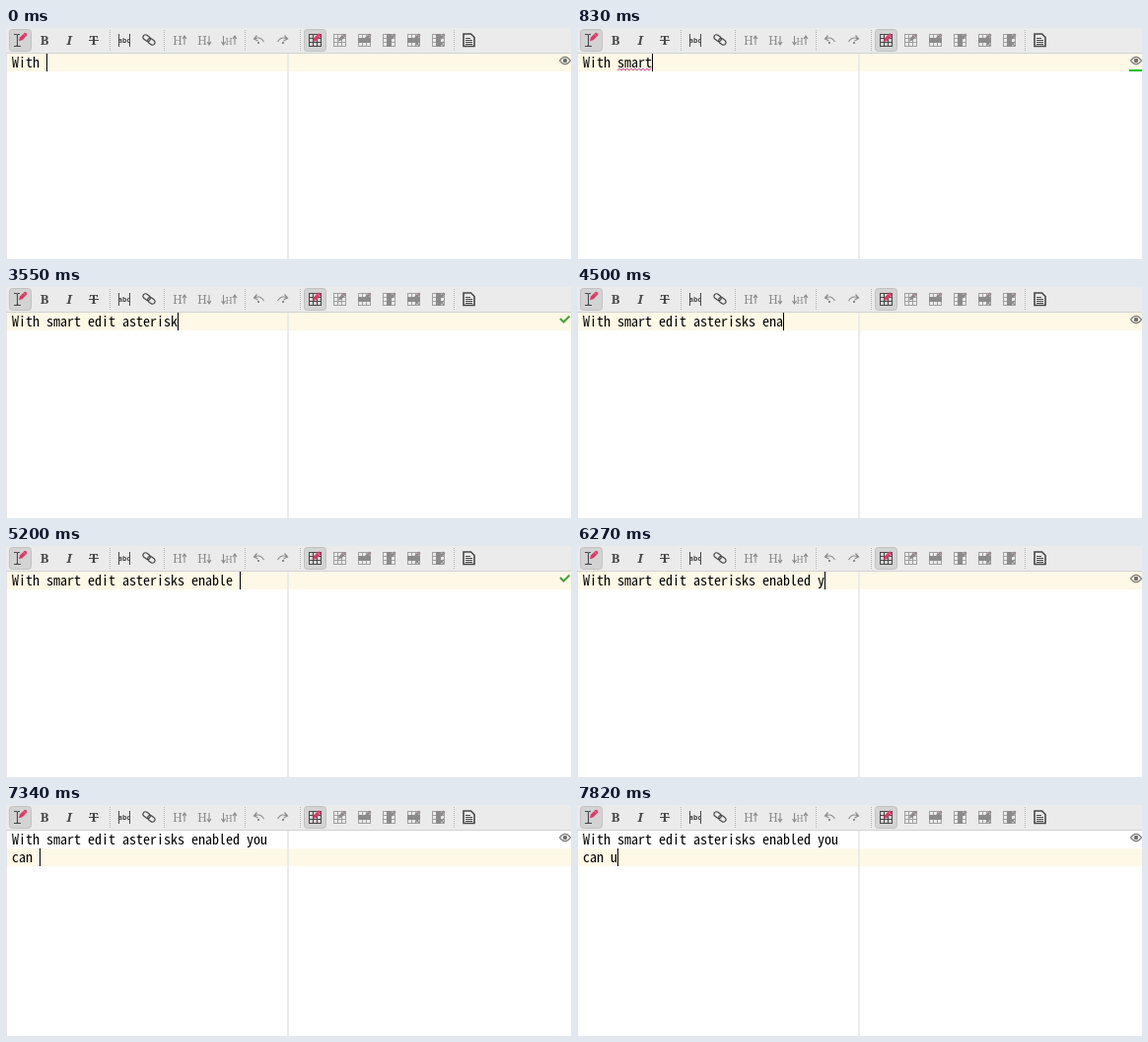
Write an HTML page with a canvas that moves like this. It is 573 px wide and 234 px high and loops after 8000 ms.

```html
<!DOCTYPE html>
<html lang="en">
<head>
<meta charset="utf-8">
<title>Typing in an editor</title>
<style>
html, body { margin: 0; width: 100%; height: 100%; overflow: hidden; background: #fff; }
canvas { display: block; }
</style>
</head>
<body>
<canvas id="stage" width="573" height="234"></canvas>
<script>
const LOOP = 8000, COL = 7, LEFT = 6, TOP = 26, ROW = 18;
const DARK = '#484848', GRAY = '#8b8b8b', PINK = '#d83a68';
const MONO = '"Noto Sans Mono CJK JP", "Noto Sans Mono", monospace';
const SERIF = '"Noto Serif", serif';
const TEXT = 'With smart edit asterisks enabled you can u';
const WRAP = 37;

// Typing bursts: start, end, character count at start, at end
const BURSTS = [
  [120, 480, 6, 9], [710, 710, 10, 10], [1070, 1660, 11, 16], [1900, 1900, 18, 18],
  [2490, 2600, 19, 20], [2840, 3190, 21, 24], [3790, 3790, 25, 25], [4020, 4260, 26, 28],
  [4500, 4960, 29, 33], [5560, 5560, 34, 34], [6270, 6510, 35, 37], [6750, 6750, 38, 38],
  [6990, 7340, 39, 42], [7820, 7820, 43, 43]
];
// Spans in which the inspection has passed
const PASSED = [[2250, 2490], [3550, 3790], [5200, 5440], [5920, 6270], [7580, 7820]];

const stage = document.getElementById('stage');
let c = stage.getContext('2d');

function box(x, y, w, h, color) {
  c.fillStyle = color;
  c.fillRect(x, y, w, h);
}
function line(d, color, width = 1) {
  c.strokeStyle = color;
  c.lineWidth = width;
  c.stroke(new Path2D(d));
}
function fill(d, color) {
  c.fillStyle = color;
  c.fill(new Path2D(d));
}
function label(s, x, y, font, color) {
  c.font = font;
  c.fillStyle = color;
  c.fillText(s, x, y);
}

function pencil(x, y, color, s = 1) {
  c.save();
  c.translate(x, y);
  c.scale(s, s);
  fill('M0 0L1 -3.6L5.6 -8.2Q6.5 -8.8 7.3 -8L8.2 -7Q8.8 -6.2 8.1 -5.5L3.6 -1Z', color);
  line('M4.6 -7.2L7.2 -4.6', '#e9a3b5', .6 * (color === PINK));
  c.restore();
}
function pressed(x) {
  c.beginPath();
  c.roundRect(x + .5, 1.5, 22, 22, 3);
  c.fillStyle = '#d3d3d3';
  c.fill();
  c.strokeStyle = '#c1c1c1';
  c.lineWidth = 1;
  c.stroke();
}
function grid(x, color) {
  let d = '';
  for (let i = 0; i < 4; i++) d += `M${x + .5 + i * 4} 6V19M${x} ${6.5 + i * 4}h13`;
  line(d, color);
}
function arrow(x, up) {
  const tip = up ? 8 : 17, back = up ? 3 : -3;
  line(`M${x} ${up ? 17 : 8}V${tip}M${x - 2} ${tip + back}L${x} ${tip}L${x + 2} ${tip + back}`, GRAY, 1.1);
}
function heading(x, size = 12) {
  c.textAlign = 'center';
  label('H', x, 17, `${size}px ${SERIF}`, GRAY);
}

function drawToolbar() {
  box(0, 0, 573, 25, '#ebebeb');
  box(0, 25, 573, 1, '#d2d2d2');
  c.setLineDash([1, 1]);
  for (const x of [105, 160, 242, 298, 454]) line(`M${x}.5 2V23`, '#b4b4b4');
  c.setLineDash([]);

  pressed(3);
  line('M8 6.5H10.5Q11.5 6.5 11.5 7.5V17Q11.5 18.5 10 18.5H8M11.5 7.5Q11.5 6.5 12.5 6.5H14M11.5 17Q11.5 18.5 13 18.5H15', DARK, 1.1);
  pencil(13, 13.2, PINK);

  c.textAlign = 'center';
  label('B', 39, 17, `bold 13px ${SERIF}`, DARK);
  label('I', 64, 17, `italic bold 13px ${SERIF}`, DARK);
  label('T', 89, 17, `bold 13px ${SERIF}`, DARK);
  box(84, 12, 10, 1, DARK);

  line('M114.5 6V19M125.5 6V19', DARK);
  label('abc', 120, 15, 'bold 7px "Open Sans", sans-serif', DARK);
  c.save();
  c.translate(145, 12);
  c.rotate(.65);
  for (const x of [-7, -1]) {
    c.beginPath();
    c.roundRect(x, -2.5, 8, 5, 2.5);
    c.strokeStyle = DARK;
    c.lineWidth = 1.2;
    c.stroke();
  }
  c.restore();

  heading(174); arrow(181, true);
  heading(199); arrow(206, false);
  arrow(220.5, false); heading(226, 9); arrow(232, true);

  line('M252 11Q258 8 261.5 14M254.5 7.5L251.5 11L255.5 13', GRAY, 1.2);
  line('M285 11Q279 8 275.5 14M282.5 7.5L285.5 11L281.5 13', GRAY, 1.2);
  box(255, 14, 2, 2, GRAY);
  box(280, 14, 2, 2, GRAY);

  pressed(302);
  for (const x of [307, 332, 357, 382, 407, 432]) grid(x, x === 307 ? DARK : '#a0a0a0');
  pencil(311, 14, PINK);
  pencil(337, 13.5, GRAY, .9);
  for (const x of [357, 407]) {
    box(x, 10, 13, 5, GRAY);
    pencil(x + 7, 12, GRAY, .75);
  }
  for (const x of [382, 432]) {
    box(x + 4, 6, 5, 13, GRAY);
    pencil(x + 7, 12, GRAY, .75);
  }
  for (const x of [407, 432]) line(`M${x + 8} 14l4 4m0 -4l-4 4`, GRAY, 1.2);

  line('M464 6H471.5L475 9.5V18.5H464Z', DARK, 1.6);
  line('M466 10.5H471M466 12.5H473M466 14.5H473M466 16.5H473', DARK);
}

function drawStatus(t) {
  if (PASSED.some(([from, to]) => t >= from && t < to)) {
    line('M562 32L565.5 35.5L571.5 29.5', '#4ba23f', 2.2);
    return;
  }
  line('M561.5 33Q567 25.5 572.5 33Q567 40.5 561.5 33Z', '#707070', 1.2);
  c.beginPath();
  c.arc(567, 33, 2.2, 0, 7);
  c.fillStyle = '#707070';
  c.fill();
}

function typedCount(t) {
  let count = 5;
  for (const [start, end, from, to] of BURSTS) {
    if (t < start) break;
    const step = (end - start) / (to - from) || 1;
    count = Math.min(to, from + Math.floor((t - start + 8) / step));
  }
  return count;
}

const toolbar = document.createElement('canvas');
toolbar.width = 573;
toolbar.height = TOP;
const screen = c;
c = toolbar.getContext('2d');
drawToolbar();
c = screen;

// Font size that gives the column width
c.font = `100px ${MONO}`;
const codeFont = `${100 * COL / c.measureText('m').width}px ${MONO}`;

function draw(t) {
  const count = typedCount(t);
  let text = TEXT.slice(0, count);
  if (count === 33 && t < 5440) text = text.slice(0, -1) + ' ';
  const lines = count > 41 ? [text.slice(0, WRAP), text.slice(WRAP + 1)] : [text];
  const row = lines.length - 1, y = TOP + row * ROW;

  box(0, 0, 573, 234, '#fff');
  c.drawImage(toolbar, 0, 0);
  box(0, y, 573, ROW, '#fef8e6');
  box(0, TOP, 1, 208, '#e4e4e4');
  box(285, TOP, 2, 208, '#ebebeb');

  lines.forEach((s, i) => label(s, LEFT, TOP + 14 + i * ROW, codeFont, '#000'));
  box(LEFT + lines[row].length * COL, y, 1, ROW, '#000');

  if (t >= 830 && t < 2130) {
    let wave = 'M41 43';
    for (let x = 43; x <= 76; x += 2) wave += `L${x} ${x % 4 === 3 ? 41 : 43}`;
    line(wave, '#e0489c');
    box(560, 42, 13, 2, '#12c012');
  }
  drawStatus(t);
}

function tick() {
  draw(performance.now() % LOOP);
  requestAnimationFrame(tick);
}
tick();
</script>
</body>
</html>
```
